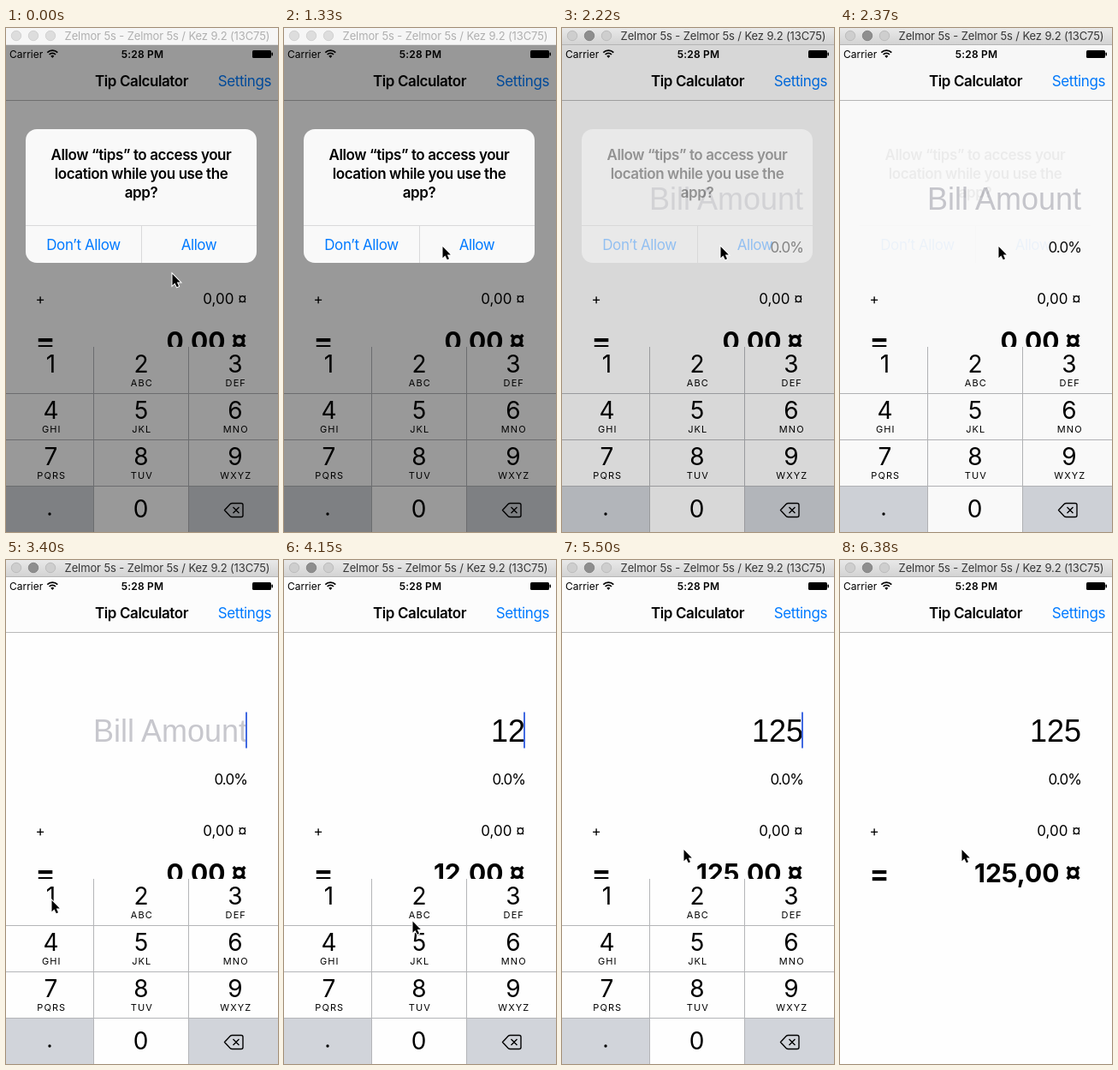
Recreate the animation shown at these times as an HTML page. Size 318 by 588 pixels, loop 8000 ms.

```html
<!DOCTYPE html>
<html lang="en">
<head>
<meta charset="utf-8">
<title>Tip Calculator</title>
<style>
  html, body { margin: 0; width: 100%; height: 100%; overflow: hidden; background: #fefefe; }
  svg { display: block; font: 17px Inter, Roboto, sans-serif; letter-spacing: -.41px; }
  text { white-space: pre; }
  .mid { text-anchor: middle; }
  .end { text-anchor: end; }
  .semi { font-weight: 600; }
  .link { fill: #007aff; }
  .small { font-size: 12px; letter-spacing: 0; }
  .bar { font-size: 13px; letter-spacing: -.12px; }
  .field { font: 36px "Liberation Sans", sans-serif; letter-spacing: 0; }
  .percent { letter-spacing: -.9px; }
  .money { letter-spacing: 0; }
  .total { font-size: 30px; font-weight: 700; letter-spacing: 0; }
  .sign { font-family: "Liberation Sans", sans-serif; font-size: 1.08em; }
  .digit { font-size: 28px; letter-spacing: 0; }
  .letters { font-size: 11px; letter-spacing: 1.1px; }
</style>
</head>
<body>
<svg width="318" height="588" viewBox="0 0 318 588">
  <defs>
    <linearGradient id="chrome" x2="0" y2="1">
      <stop stop-color="#e9e9e9"/><stop offset="1" stop-color="#d2d2d2"/>
    </linearGradient>
  </defs>

  <rect width="318" height="588" fill="#fefefe"/>
  <rect y="20" width="318" height="64" fill="#fcfcfc"/>
  <rect y="84" width="318" height="1" fill="#b9b9b9"/>

  <!-- status bar -->
  <text class="small" x="4" y="34.5">Carrier</text>
  <path d="M48.3 28.6a8.5 8.5 0 0 1 12 0M50.6 31a5.2 5.2 0 0 1 7.4 0" fill="none" stroke="#000" stroke-width="1.7"/>
  <path d="M54.3 35l-2-2.2a2.900 2.900 0 0 1 4 0z"/>
  <text class="small semi mid" x="159.5" y="34.5" style="letter-spacing:.2px">5:28 PM</text>
  <rect x="288" y="26" width="22" height="9" rx="1.5"/>
  <rect x="310.5" y="28.5" width="1.5" height="4" rx=".7"/>

  <!-- navigation and form -->
  <text class="semi mid" x="158.5" y="68">Tip Calculator</text>
  <text class="link end" x="310" y="68">Settings</text>
  <text id="amount" class="field end" x="282" y="212"></text>
  <rect id="caret" x="280" y="177.5" width="2" height="42" fill="#4169e1"/>
  <text class="percent end" x="282" y="262">0.0%</text>
  <text x="34.5" y="322">+</text>
  <text class="money end" x="281.5" y="322">0,00 <tspan class="sign">¤</tspan></text>
  <text class="total" x="34.5" y="378" style="font-size:34px">=</text>
  <text class="total end" x="281.5" y="375.5"><tspan id="total"></tspan>,00 <tspan class="sign">¤</tspan></text>

  <g id="keyboard"></g>
  <rect id="dim" y="20" width="318" height="568"/>

  <g id="alertPlate">
    <rect x="23" y="118" width="270" height="156" rx="13" fill="#f9f9f9"/>
    <path d="M23 230.5H293M158.5 231V274" stroke="#d9d9db"/>
  </g>
  <g id="alertText" class="mid">
    <g class="semi">
      <text x="158" y="154">Allow “tips” to access your</text>
      <text x="158" y="176">location while you use the</text>
      <text x="158" y="198">app?</text>
    </g>
    <g class="link">
      <text x="90.5" y="259">Don’t Allow</text>
      <text x="225.5" y="259">Allow</text>
    </g>
  </g>

  <!-- window title bar -->
  <rect id="chromeBar" width="318" height="20"/>
  <rect id="chromeLine" y="19" width="318" height="1"/>
  <g id="lights">
    <circle cx="12" cy="9" r="5.7"/><circle cx="32" cy="9" r="5.7"/><circle cx="52" cy="9" r="5.7"/>
  </g>
  <text id="barTitle" class="bar mid" x="188.5" y="14">Zelmor 5s - Zelmor 5s / Kez 9.2 (13C75)</text>

  <path id="pointer" d="M1.5 2V15.2L4.4 12.4L6.8 17.2L9 16.2L6.8 11.6H10.8Z"
        stroke="#fff" stroke-width="2" paint-order="stroke"/>
</svg>

<script>
const $ = id => document.getElementById(id);
const LOOP = 8000, TICKS = 54;

// Each track is a list of [tick, ...values], linear between entries.
const pointerTrack = [
  [0, 193, 285], [1, 200, 291], [2, 200, 291], [4, 166, 317], [5, 149, 320],
  [6, 152, 309], [7, 164, 284], [8, 178, 260], [9, 184, 253], [18, 184, 253],
  [19, 176, 266], [21, 90, 360], [22, 60, 390], [23, 52, 395], [24, 52, 395],
  [26, 149, 399], [27, 149, 399], [29, 149, 440], [30, 149, 450], [33, 149, 450],
  [35, 146, 385], [36, 142, 349], [37, 141, 336]
];
// Opacity of the alert's text and of its plate.
const alertTrack = [[13, 1, 1], [14, .9, .95], [15, .37, .52], [16, .05, .04], [17, 0, 0]];
const slideTrack = [[38, 0], [39, 14], [40, 125], [41, 195], [42, 212], [43, 216]];

function at(track, tick) {
  const next = track.findIndex(k => k[0] > tick);
  if (next < 0) return track[track.length - 1].slice(1);
  if (next === 0) return track[0].slice(1);
  const a = track[next - 1], b = track[next];
  const p = (tick - a[0]) / (b[0] - a[0]);
  return a.slice(1).map((v, i) => v + (b[i + 1] - v) * p);
}

function buildKeyboard() {
  const centre = [52.5, 158, 268];
  const labels = ["", "ABC", "DEF", "GHI", "JKL", "MNO", "PQRS", "TUV", "WXYZ"];
  let out = `<rect y="372" width="318" height="216" fill="#fefefe"/>
    <path d="M0 534H102V588H0ZM214 534H318V588H214Z" fill="#d1d4da"/>
    <rect id="pressed" x="103" y="427" width="110" height="53" fill="#d1d4da"/>`;
  labels.forEach((label, i) => {
    const x = centre[i % 3], y = 402 + 54 * Math.floor(i / 3);
    out += `<text class="digit mid" x="${x}" y="${y}">${i + 1}</text>
      <text class="letters mid" x="${x + .8}" y="${y + 15.5}">${label}</text>`;
  });
  out += `<text class="digit mid" x="157.5" y="571">0</text>
    <circle cx="51" cy="567" r="1.7"/>
    <path d="M0 426.5H318M0 480.5H318M0 534.5H318M102.5 372V588M213.5 372V588" stroke="#b4b5b8"/>
    <path d="M255.5 562.5L262 555.5Q263 554.5 264.5 554.5H275Q277 554.5 277 556.5V568.5Q277 570.5 275 570.5H264.5Q263 570.5 262 569.5ZM265.5 559L272.5 566M272.5 559L265.5 566"
      fill="none" stroke="#000" stroke-width="1.4" stroke-linejoin="round"/>`;
  $("keyboard").innerHTML = out;
}

const set = (id, attrs) => {
  for (const name in attrs) $(id).setAttribute(name, attrs[name]);
};
const show = (id, on) => set(id, { visibility: on ? "visible" : "hidden" });

function draw(time) {
  const tick = Math.floor((time % LOOP + 8) * TICKS / LOOP) % TICKS;
  const active = tick >= 14;
  const typed = "125".slice(0, tick < 24 ? 0 : tick < 27 ? 1 : tick < 32 ? 2 : 3);
  const [fade, plate] = at(alertTrack, tick);

  set("chromeBar", { fill: active ? "url(#chrome)" : "#f6f6f6" });
  set("chromeLine", { fill: active ? "#b5b5b5" : "#dedede" });
  set("barTitle", { fill: active ? "#363636" : "#b0b0b0" });
  [...$("lights").children].forEach((light, i) => {
    light.setAttribute("fill", !active ? "#dddddd" : i === 1 ? "#8e8e8e" : "#cecece");
    light.setAttribute("stroke", !active ? "#d2d2d2" : i === 1 ? "#858585" : "#bdbdbd");
  });

  $("amount").textContent = typed || "Bill Amount";
  set("amount", { fill: typed ? "#000" : "#c7c7cd" });
  $("total").textContent = typed || "0";
  show("caret", tick >= 19 && tick < 39 && tick !== 35 && tick !== 36);
  show("pressed", tick === 32);

  set("dim", { opacity: .4 * fade });
  set("alertText", { opacity: fade });
  set("alertPlate", { opacity: plate });
  set("keyboard", { transform: `translate(0 ${at(slideTrack, tick)})` });
  set("pointer", { transform: `translate(${at(pointerTrack, tick)})` });
}

buildKeyboard();
draw(0);
const start = performance.now();
requestAnimationFrame(function loop() {
  draw(performance.now() - start);
  requestAnimationFrame(loop);
});
</script>
</body>
</html>
```
